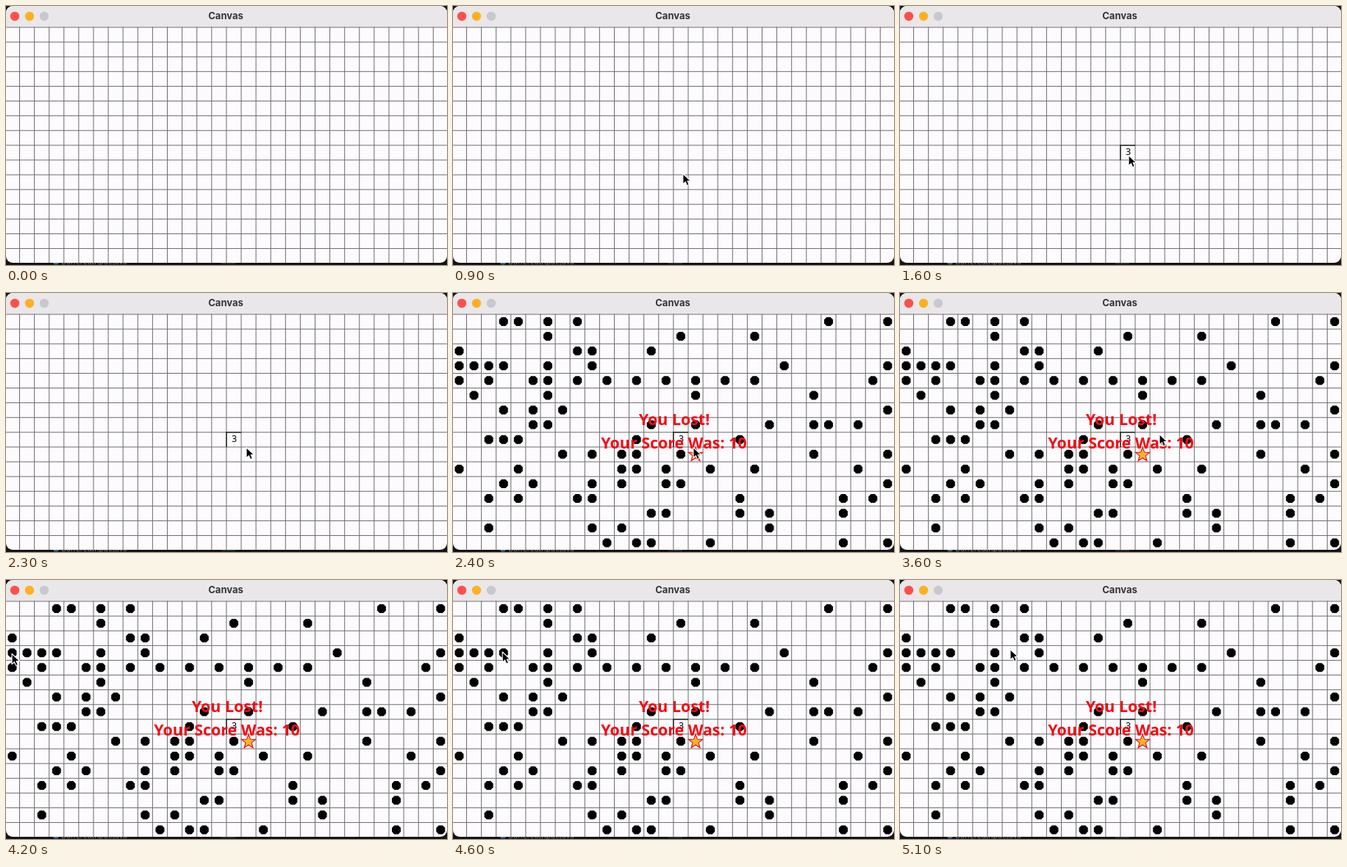
Animation of 600x353 px, one loop 5.8 s. Source, as an HTML page:

```html
<!DOCTYPE html>
<html lang="en">
<head>
<meta charset="utf-8">
<title>Canvas</title>
<style>
  html, body { margin: 0; width: 100%; height: 100%; overflow: hidden; background: #111418; }
  svg { display: block; width: 600px; height: 353px; }
  text { text-anchor: middle; }
  .title { font: 700 13px Inter, sans-serif; fill: #363437; }
  .code { font: 10.2px "Noto Sans", sans-serif; fill: #777c82; }
  .digit { font: 12.5px "Noto Sans", sans-serif; fill: #000; }
  .result { font: 700 21.4px "Noto Sans", sans-serif; fill: #f50a14; }
</style>
</head>
<body>
<svg viewBox="0 0 600 353">
  <defs>
    <clipPath id="frame"><rect width="600" height="350" rx="9"/></clipPath>
  </defs>
  <rect width="600" height="353" fill="#111418"/>
  <circle cx="68" cy="348" r="4.5" fill="#3a6d86"/>
  <text class="code" x="120" y="352">BufferedInput.java</text>
  <rect x="293" y="349" width="19" height="3" fill="#1c3433"/>
  <g clip-path="url(#frame)">
    <rect width="600" height="350" fill="#fdfbfe"/>
    <rect width="600" height="28.5" fill="#e9e7e9"/>
    <circle cx="12" cy="14" r="6.2" fill="#fe504a"/>
    <circle cx="32" cy="14" r="6.2" fill="#ffb022"/>
    <circle cx="52" cy="14" r="6.2" fill="#c9c8ca"/>
    <text class="title" x="299" y="18">Canvas</text>
    <path id="grid" fill="none" stroke="#6b6b6c"/>
    <g id="hint">
      <path id="hintEdge" fill="none" stroke="#111" stroke-width="1.3"/>
      <text class="digit" x="310.5" y="203">3</text>
    </g>
    <g id="loss">
      <path id="mines"/>
      <path id="starEdge" fill="#fff4ec" stroke="#e8121c" stroke-width="1.4"/>
      <path id="starCore" fill="#fbb41c" stroke="#fbb41c" stroke-linejoin="round"/>
      <text class="result" x="301" y="180">You Lost!</text>
      <text class="result" x="300.5" y="212">Your Score Was: 10</text>
    </g>
  </g>
  <path id="cursor" d="M0 .5V14.8L3.4 11.6L5.6 16.7L8.3 15.5L6.1 10.5H10.6Z"
        stroke="#fff" stroke-width="1.1" stroke-linejoin="round"/>
</svg>
<script>
  const LOOP = 5.8, RATE = 10;
  const COLS = 30, ROWS = 16, MINES = 99;
  const CELL = 20.1, LEFT = -1.6, TOP = 29.05;
  const HINT = { col: 15, row: 8, time: 1.5 };
  const LOSS = { col: 16, row: 9, time: 2.4 };
  const ENTER = { x: 318, y: 250, time: 0.1 };

  // Pointer moves in seconds; it rests between them.
  const moves = [
    { from: 0.1, to: 0.6, x: 313, y: 230 },
    { from: 0.8, to: 1.4, x: 311, y: 203 },
    { from: 1.9, to: 2.3, x: 327, y: 210 },
    { from: 2.4, to: 2.9, x: 367, y: 186 },
    { from: 2.9, to: 3.6, x: 353, y: 192 },
    { from: 3.8, to: 4.2, x: 8, y: 100 },
    { from: 4.2, to: 5.1, x: 150, y: 94 }
  ];

  const $ = id => document.getElementById(id);
  const setPath = (id, d) => $(id).setAttribute("d", d);
  const show = (id, on) => $(id).setAttribute("visibility", on ? "visible" : "hidden");
  const colX = col => LEFT + CELL * col;
  const rowY = row => TOP + CELL * row;

  function seeded(seed) {
    return n => {
      seed = seed * 16807 % 2147483647;
      return Math.floor(seed / 2147483647 * n);
    };
  }

  // Scatter mines, keeping exactly three around the hint.
  function layMines() {
    const pick = seeded(2024);
    const index = (col, row) => row * COLS + col;
    const struck = index(LOSS.col, LOSS.row);
    const mines = new Set([struck, index(16, 7), index(15, 9)]);
    while (mines.size < MINES) {
      const col = pick(COLS), row = pick(ROWS);
      const near = Math.abs(col - HINT.col) < 2 && Math.abs(row - HINT.row) < 2;
      if (!near) mines.add(index(col, row));
    }
    mines.delete(struck);
    return [...mines];
  }

  function minePath(i) {
    const x = colX(i % COLS + 0.5), y = rowY(Math.floor(i / COLS) + 0.5) - 0.2;
    return `M${x - 2.7} ${y - 6}h5.4l3.3 3.3v5.4l-3.3 3.3h-5.4l-3.3 -3.3v-5.4z`;
  }

  function gridPath() {
    let d = "";
    for (let c = 1; c < COLS; c++) d += `M${colX(c)} 28.5V350`;
    for (let r = 0; r < ROWS; r++) d += `M0 ${rowY(r)}H600`;
    return d;
  }

  function starPath(radius) {
    const cx = colX(LOSS.col + 0.5), cy = rowY(LOSS.row + 0.5) + 0.5;
    const points = Array.from({ length: 10 }, (_, i) => {
      const a = i * Math.PI / 5 - Math.PI / 2, r = i % 2 ? radius * 0.42 : radius;
      return `${cx + r * Math.cos(a)} ${cy + r * Math.sin(a)}`;
    });
    return `M${points.join("L")}Z`;
  }

  function pointerAt(time) {
    let { x, y } = ENTER;
    for (const m of moves) {
      const t = Math.min(1, Math.max(0, (time - m.from) / (m.to - m.from)));
      const ease = t * t * (3 - 2 * t);
      x += (m.x - x) * ease;
      y += (m.y - y) * ease;
    }
    return `translate(${x} ${y})`;
  }

  function draw(seconds) {
    const time = Math.floor(seconds % LOOP * RATE) / RATE;
    show("hint", time >= HINT.time);
    show("loss", time >= LOSS.time);
    show("cursor", time >= ENTER.time);
    $("cursor").setAttribute("transform", pointerAt(time));
  }

  setPath("grid", gridPath());
  setPath("hintEdge", `M${colX(HINT.col)} ${rowY(HINT.row + 1)}v${-CELL}h${CELL}`);
  setPath("mines", layMines().map(minePath).join(""));
  setPath("starEdge", starPath(9.8));
  setPath("starCore", starPath(6.8));

  const start = performance.now();
  function tick() {
    draw((performance.now() - start) / 1000);
    requestAnimationFrame(tick);
  }
  tick();
</script>
</body>
</html>
```
